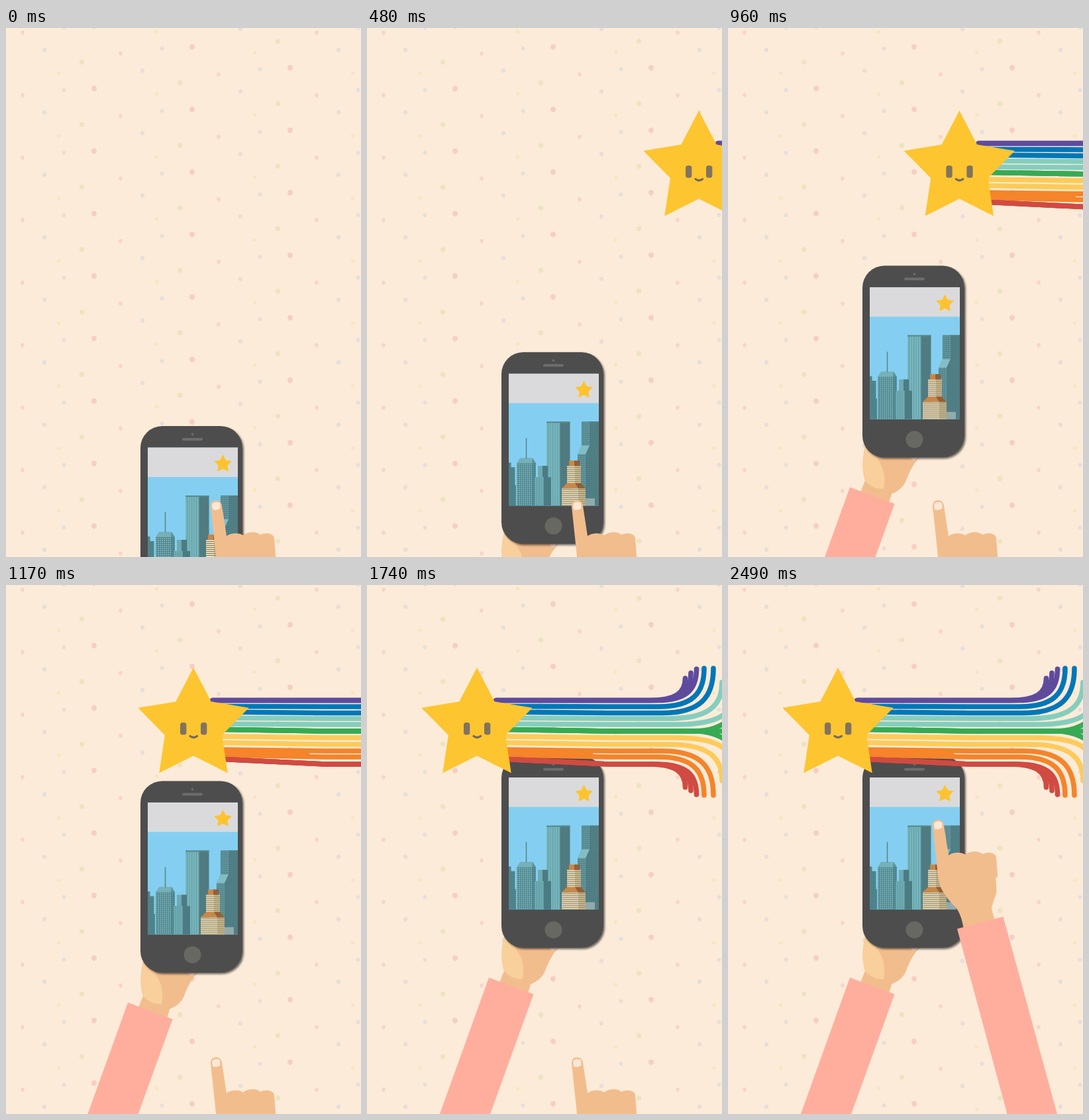
Animation of 536x800 px, one loop 3720 ms. Source, as an HTML page:

```html
<!DOCTYPE html>
<html lang="en">
<head>
<meta charset="utf-8">
<title>Star over the city</title>
<style>
html, body { margin: 0; width: 100%; height: 100%; overflow: hidden; background: #fcebd8; }
svg { display: block; width: 100%; height: 100%; }
.rainbow path { fill: none; stroke-width: 7.6; stroke-linecap: round; }
</style>
</head>
<body>
<svg viewBox="0 0 536 800">
  <defs>
    <pattern id="bars" width="3.5" height="8" patternUnits="userSpaceOnUse">
      <path d="M.6 0V8" stroke="#5e989f" stroke-width="1"/>
    </pattern>
    <pattern id="grid" width="3" height="3" patternUnits="userSpaceOnUse">
      <path d="M.5 0V3M0 .5H3" stroke="#497980" stroke-width=".8"/>
    </pattern>
    <pattern id="rows" width="8" height="3" patternUnits="userSpaceOnUse">
      <path d="M0 .7H8" stroke="#80775a" stroke-width="1.2"/>
    </pattern>
    <filter id="shade" x="-10%" y="-10%" width="120%" height="120%">
      <feDropShadow dx="2" dy="2" stdDeviation="1.5" flood-color="#000" flood-opacity=".55"/>
    </filter>
  </defs>
  <rect width="536" height="800" fill="#fcebd8"/>
  <g id="dots"></g>

  <g id="phone">
    <path fill="#f2bd8d" d="M207 570Q200 600 207 622L199 642L243 656L247 642Q262 636 268 624Q275 605 283 594L291 585L280 570Z"/>
    <path fill="#f9cf9b" d="M207 572Q200 602 207 622Q220 636 235 634Q239 612 230 596Q222 586 218 572Z"/>
    <path fill="#f5dccd" d="M276 584Q276 592 282 591Q288 588 290 584Z"/>
    <path fill="#ffae9e" d="M184 632L251.500 657L145 952H69Z"/>
    <rect x="203" y="297" width="154" height="290" rx="33" fill="#4e4e4e" filter="url(#shade)"/>
    <circle cx="281.500" cy="309.500" r="1.900" fill="#6d6d6d"/>
    <rect x="266" y="315" width="31" height="4" rx="2" fill="#6d6d6d"/>
    <circle cx="281.500" cy="559.700" r="13" fill="#676862"/>
    <rect x="214" y="329.500" width="136" height="199.500" fill="#84cff1"/>
    <rect x="214" y="329.500" width="136" height="44.500" fill="#dadadc"/>
    <path class="star" data-x="327.500" data-y="354.300" data-r="14" fill="#fdc32e"/>

    <path fill="#4f838b" d="M214 464H217.500V471H223.500V498H225V529H214Z"/>
    <path fill="#76b1b9" d="M226 465L231 457H250L255 465V529H226Z"/>
    <path fill="#5b959d" d="M250 457L255 465V529H249V465Z"/>
    <path fill="url(#grid)" d="M226 465H255V529H226Z"/>
    <path stroke="#5a858c" stroke-width="1.600" d="M240.500 427V458"/>
    <path fill="#7ab8bf" d="M271 402H292V529H271Z"/>
    <path fill="url(#bars)" d="M271 402H292V529H271Z"/>
    <path fill="#507b80" d="M291.500 402H306.500V529H291.500Z"/>
    <path fill="#568a90" d="M271 402H306.500V404H271Z"/>
    <path fill="#6eabb3" d="M258 469H273V486H278V529H253V486H258Z"/>
    <path fill="#4b7b83" d="M265 469H273V486H265ZM267 486H278V529H267Z"/>
    <path fill="url(#bars)" d="M253 486H267V529H253Z"/>
    <path fill="#6aa0a8" d="M324 402H350V529H318V451L324 438Z"/>
    <path fill="#568289" d="M336 402H350V529H330V451L336 438Z"/>
    <path fill="#82bec5" d="M324 438H336L330 451H318Z"/>
    <path fill="url(#grid)" d="M324 402H350V529H318V452H330L336 438H324Z"/>
    <path fill="#92aaab" d="M330 518H344V529H330Z"/>

    <path fill="#f4e8c6" d="M302 469H323V496H302ZM294 503H330V529H294Z"/>
    <path fill="#d9c79a" d="M314 469H323V496H314ZM319 503H330V529H319Z"/>
    <path fill="url(#rows)" d="M302 469H323V496H302ZM294 503H330V529H294Z"/>
    <path fill="#c98748" d="M305 461H321V469H305ZM302 495H323L330 503H294Z"/>
    <path fill="#925f38" d="M313 461H321V469H313ZM314 495H323L330 503H319Z"/>
  </g>

  <g id="flyer">
    <g class="rainbow" id="rainbow"></g>
    <path class="star" data-x="166" data-y="213" data-r="88" fill="#fdc52f"/>
    <g fill="#80735f">
      <rect x="146" y="208" width="9.300" height="18.500" rx="3.500"/>
      <rect x="177" y="208" width="9.300" height="18.500" rx="3.500"/>
    </g>
    <path fill="none" stroke="#76685b" stroke-width="3.200" stroke-linecap="round" d="M161 228.500Q166 232.500 171.500 228.500"/>
  </g>

  <g id="hand">
    <path fill="#f2bd8d" d="M309 364C308 352 325 352 326 363L333 409C338 404 353 403 358 408C364 402 379 401 384 407C391 403 404 404 405 412L407 438Q407 443 404 443Q406 455 405 467Q399 482 398 490L403 508L356 522Q353 500 345 489Q329 473 322 459Q317 447 316 430Z"/>
    <path fill="#fbe7d8" d="M311 360Q317 355 323 359L323.500 367Q318 371 312 368.500Z"/>
    <path fill="#ffae9e" d="M346 520L415.500 501.500L497 800L605 1195H529L421.500 800Z"/>
  </g>
</svg>
<script>
const NS = 'http://www.w3.org/2000/svg';
const $ = id => document.getElementById(id);

function add(parent, tag, attrs) {
  const el = document.createElementNS(NS, tag);
  for (const k in attrs) el.setAttribute(k, attrs[k]);
  parent.append(el);
}

// Confetti on a slanted lattice: x, y, radius, colour, stem
const confetti = [
  [25, 7, 2.9, '#f8d4c9', 1], [133, 91.5, 3.9, '#f6cec4', 1],
  [58, 33, 3.2, '#e6dfda', 0], [79.5, 68.5, 2.6, '#f7e6bd', 0],
  [87.5, 94, 2.9, '#e3dfdc', 0], [114.5, 51.5, 3.7, '#ebe5bf', 0]
];
for (const [x, y, r, fill, stem] of confetti)
  for (let i = -1; i < 4; i++)
    for (let j = -3; j < 10; j++) {
      const cx = x + i * 148, cy = y + i * 31.5 + j * 94.5;
      add($('dots'), 'circle', { cx, cy, r, fill });
      if (stem) add($('dots'), 'rect', { x: cx - .6, y: cy, width: 1.2, height: r + 1.2, fill });
    }

for (const el of document.querySelectorAll('.star')) {
  const { x, y, r } = el.dataset;
  const points = Array.from({ length: 10 }, (_, i) => {
    const a = i * Math.PI / 5, d = r * (i % 2 ? .515 : 1);
    return [+x + d * Math.sin(a), y - d * Math.cos(a)];
  });
  el.setAttribute('d', 'M' + points.join('L') + 'Z');
}

// Ribbons: colour, left y, right y, end x, end y, start of the bend
const ribbons = [
  ['#5f4b9d', 174.5, 174.5, 480.5, 141, 425], ['#5f4b9d', 174.5, 174.5, 489, 133, 432],
  ['#5f4b9d', 174.5, 174.5, 497.5, 127, 438],
  ['#0077b8', 183.5, 184, 509, 126, 440], ['#0077b8', 192, 193.5, 523, 126, 445],
  ['#84cebe', 201, 202, 536, 147, 455], ['#84cebe', 210, 211, 550, 170, 465],
  ['#fdcb59', 229, 231, 550, 275, 465], ['#fdcb59', 238.5, 241, 536, 296, 455],
  ['#f5842a', 249, 251, 523, 318, 445], ['#f5842a', 257, 260, 509, 318, 440],
  ['#d04b42', 263.5, 271, 480.5, 306, 425], ['#d04b42', 263.5, 271, 489, 311, 432],
  ['#d04b42', 263.5, 271, 497.5, 317, 438]
];
const draw = (stroke, d) => add($('rainbow'), 'path', { stroke, d });
for (const [c, y0, y1, x, y, b] of ribbons)
  draw(c, `M195 ${y0}H212L365 ${y1}H${b}C${b + (x - b) * .75} ${y1} ${x} ${y1 + (y - y1) * .35} ${x} ${y}`);
draw('#f5842a', 'M200 253L338 257');
for (const y of [205, 221, 237])
  draw('#36aa55', `M195 218.5H215L365 221H495Q525 221 545 ${y}`);

const clamp = u => Math.min(1, Math.max(0, u));
const speedUp = u => .8 * u + .2 * u * u;
const move = (id, x, y) => $(id).setAttribute('transform', `translate(${x} ${y})`);

function starShift(t) {
  if (t < 1170) return 117 + (1170 - t) * .316;
  return 117 * (1 - clamp((t - 1170) / 570));
}

function frame(now) {
  const t = Math.floor(now % 3720 / 30) * 30;
  move('phone', 0, 305 - 343.3 * speedUp(clamp(t / 1290)));
  move('flyer', starShift(t), 0);
  move('hand', 0, 359.5 * (1 - speedUp(clamp((t - 1780) / 710))));
  requestAnimationFrame(frame);
}
requestAnimationFrame(frame);
</script>
</body>
</html>
```
